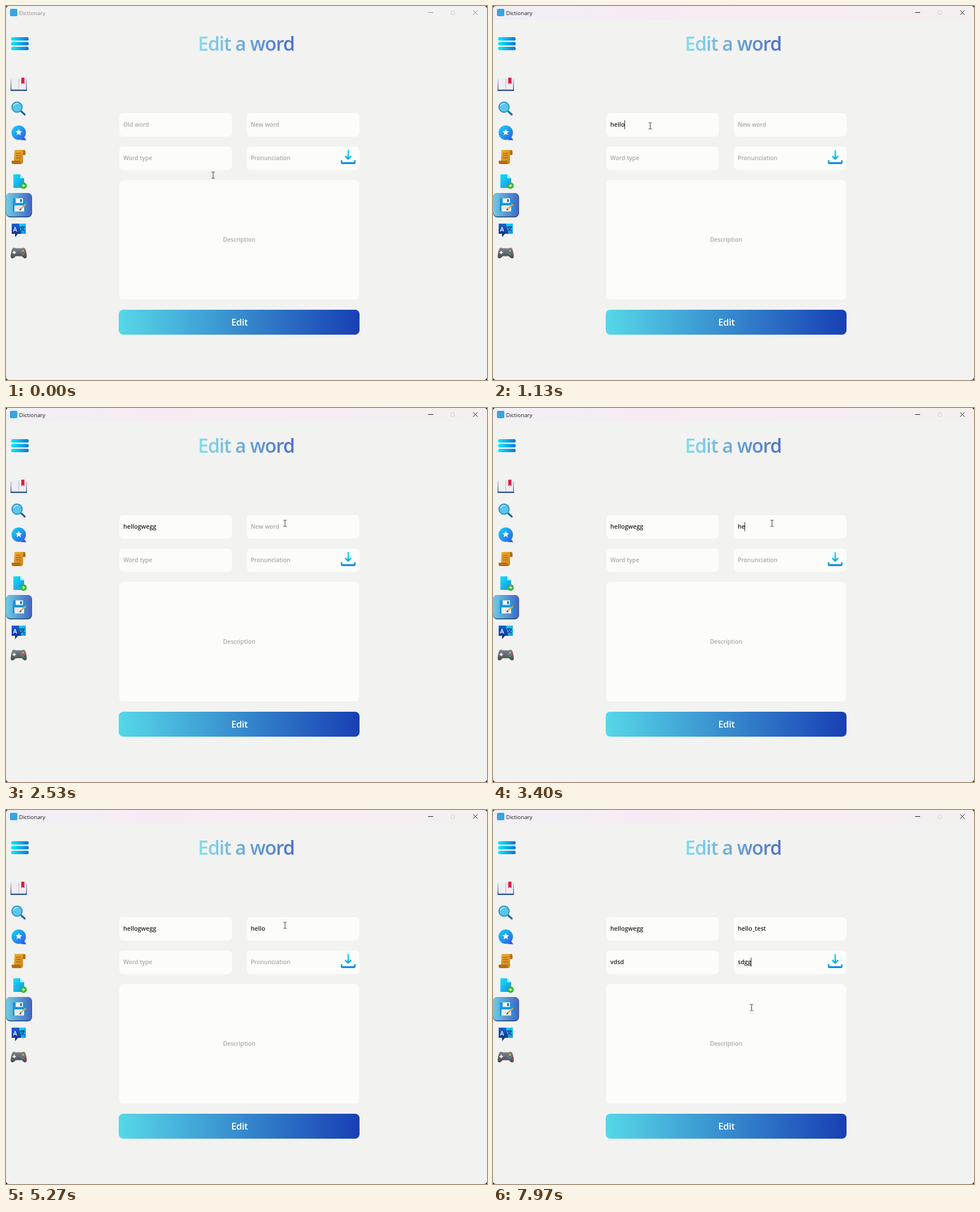
An HTML page that plays this animation: 849 by 660 pixels, repeating every 8000 ms.

```html
<!DOCTYPE html>
<html lang="en">
<head>
<meta charset="utf-8">
<title>Dictionary</title>
<style>
  html, body { margin: 0; width: 100%; height: 100%; overflow: hidden; background: #222; }
  svg { display: block; width: 849px; height: 660px; font-family: "Open Sans", "Noto Sans", sans-serif; }
  .field { fill: #fcfdfb; stroke: #edf3ef; }
  .hint, .typed { font-weight: 600; white-space: pre; }
  .hint { font-size: 10.3px; fill: #aba7a4; }
  .typed { font-size: 10.7px; fill: #242220; }
</style>
</head>
<body>
<svg viewBox="0 0 849 660">
  <defs>
    <linearGradient id="button"><stop stop-color="#56d8e8"/><stop offset="1" stop-color="#183fb4"/></linearGradient>
    <linearGradient id="heading"><stop stop-color="#86deea"/><stop offset="1" stop-color="#4b6fc8"/></linearGradient>
    <linearGradient id="tile"><stop stop-color="#70cde2"/><stop offset="1" stop-color="#4365c4"/></linearGradient>
    <linearGradient id="menu"><stop stop-color="#0cecfd"/><stop offset="1" stop-color="#1173d8"/></linearGradient>
    <linearGradient id="cyan" x2="1" y2="1"><stop stop-color="#10e4fa"/><stop offset="1" stop-color="#1d8be0"/></linearGradient>
    <linearGradient id="drop" gradientUnits="userSpaceOnUse" x1="0" x2="0" y1="254" y2="280"><stop stop-color="#10e4f6"/><stop offset="1" stop-color="#1584d8"/></linearGradient>
    <linearGradient id="bubble" x2="1" y2="1"><stop stop-color="#10d8fc"/><stop offset="1" stop-color="#3257e4"/></linearGradient>
    <linearGradient id="gold" x2="1" y2="1"><stop stop-color="#f0b43c"/><stop offset="1" stop-color="#c47c16"/></linearGradient>
    <linearGradient id="navy" x2="0" y2="1"><stop stop-color="#1b62d2"/><stop offset="1" stop-color="#082a80"/></linearGradient>
    <linearGradient id="pad" x2="0" y2="1"><stop stop-color="#84858a"/><stop offset="1" stop-color="#46474c"/></linearGradient>
    <linearGradient id="cover" x2="0" y2="1"><stop stop-color="#c9cdd8"/><stop offset="1" stop-color="#294f8b"/></linearGradient>
    <linearGradient id="bar"><stop stop-color="#f1eff5"/><stop offset=".3" stop-color="#f6ebf4"/><stop offset="1" stop-color="#f5eff0"/></linearGradient>
    <clipPath id="window"><rect width="849" height="660" rx="5"/></clipPath>
  </defs>

  <g clip-path="url(#window)">
    <rect width="849" height="660" fill="#f2f2f1"/>
    <rect id="activeBar" width="849" height="24" fill="url(#bar)"/>
    <rect x="7" y="5" width="13" height="13" rx="2" fill="#35a5e6"/>
    <g id="chrome">
      <text x="23" y="15.5" font-size="9.8" fill="currentColor">Dictionary</text>
      <path d="M745 11.5h9M824.5 7.5l8 8m0-8l-8 8" stroke="currentColor" fill="none"/>
    </g>
    <rect x="785.5" y="8.5" width="6" height="6.5" rx="1" fill="none" stroke="#d0cdd0"/>

    <text x="424" y="79" text-anchor="middle" font-size="33.5" font-weight="600" letter-spacing="-1" fill="url(#heading)">Edit a word</text>

    <!-- menu -->
    <g fill="url(#menu)">
      <rect x="9" y="55" width="31" height="6" rx="2.5"/>
      <rect x="9" y="63.5" width="31" height="6" rx="2.5"/>
      <rect x="9" y="72" width="31" height="6" rx="2.5"/>
    </g>

    <!-- book -->
    <path d="M8 129h29v21H8z" fill="url(#cover)"/>
    <path d="M9.5 127q7-2 13 1.5q6-3.5 13-1.5v20.5H9.5z" fill="#f0edf2"/>
    <path d="M22.5 128v20" stroke="#b9bdc8"/>
    <path d="M27 126.5h5.5V138l-2.750-2-2.750 2z" fill="#e5173f"/>

    <!-- search -->
    <path d="M27 186l6 5.5" stroke="#1b6aa8" stroke-width="3.5" stroke-linecap="round"/>
    <circle cx="19.5" cy="178.5" r="9" fill="#5cc6ea" stroke="#2c94c6" stroke-width="2"/>
    <path d="M13 177q2-5 8-5" stroke="#a4e4f7" stroke-width="2" fill="none"/>

    <!-- favourites -->
    <path d="M31 230l5 7-10-.5z" fill="#3257e4"/>
    <circle cx="22.5" cy="223.5" r="12.7" fill="url(#bubble)"/>
    <path id="star" fill="#fff"/>

    <!-- history -->
    <path d="M15 254h17q3 1 2 9h-4v13q-1 3-4 3H12q-3-1-2-6h4z" fill="url(#gold)"/>
    <path d="M30 263v-6q0-3 2.5-3t1.8 9zM10 273h15q0 5 2 6H12q-2-1-2-6z" fill="#b56d0c"/>
    <path d="M17 260h9m-9 4h9m-9 4h9" stroke="#96590a" stroke-width="1.2"/>

    <!-- add -->
    <path d="M13 297h12l7 7v17H13z" fill="url(#cyan)"/>
    <path d="M25 297v7h7z" fill="#a5eefa"/>
    <circle cx="31" cy="317" r="5.7" fill="#2fb52f"/>
    <path d="M28 317h6m-3-3v6" stroke="#eaffea" stroke-width="1.3"/>

    <!-- edit (selected) -->
    <rect y="330" width="46" height="43" rx="8" fill="#204577"/>
    <rect y="330" width="45.500" height="41.500" rx="8" fill="url(#tile)"/>
    <path d="M12 339.5h20l3 3v20H12z" fill="#1597e0"/>
    <path d="M17 339.5h13v8H17zM15 352h17v10.5H15z" fill="#f5f8fc"/>
    <path d="M25 341h3v5h-3z" fill="#2767a9"/>
    <path d="M18 355h8m-8 3h6" stroke="#b6c6d7"/>
    <path d="M26 358l9-8" stroke="#f0a734" stroke-width="2.5"/>
    <path d="M23.5 361l1.5-4 2.5 2.5z" fill="#493525"/>

    <!-- translate -->
    <path d="M22 384h13v18H22z" fill="url(#cyan)"/>
    <path d="M10 384h13l4 18h-6l-5 6v-6h-6z" fill="url(#navy)"/>
    <text x="12.5" y="397.5" font-size="10.5" font-weight="600" fill="#fff">A</text>
    <path d="M25 390h8m-4-2v2m3 0q-2 5-6 7m0-7q2 5 7 7" stroke="#0b337e" stroke-width="1.3" fill="none"/>

    <!-- games -->
    <path d="M13 426.5q3 0 4 1h11q1-1 4-1q3 1 4.500 12q1 7-3 7q-3-.5-5.500-4H17q-2.500 3.500-5.500 4q-4 0-3-7q1.500-11 4.500-12z" fill="url(#pad)"/>
    <path d="M11.5 435h6m-3-3v6" stroke="#f2f2f2" stroke-width="2"/>
    <circle cx="30" cy="432" r="1.5" fill="#e9c33a"/><circle cx="30" cy="438" r="1.5" fill="#40aa52"/>
    <circle cx="27" cy="435" r="1.5" fill="#418fe1"/><circle cx="33" cy="435" r="1.5" fill="#e04646"/>

    <!-- form -->
    <g id="form"></g>
    <rect class="field" x="199.5" y="306.5" width="424.5" height="212" rx="8"/>
    <text class="hint" x="411.5" y="416" text-anchor="middle">Description</text>
    <path d="M604 255v15m-4.500-4.500l4.500 4.500 4.500-4.500" fill="none" stroke="url(#drop)" stroke-width="2.5" stroke-linecap="round" stroke-linejoin="round"/>
    <path d="M591 272h2.5v3.500h21V272h2.5v4q0 3-3 3h-20q-3 0-3-3z" fill="url(#drop)"/>
    <rect x="199" y="536" width="425" height="44" rx="8" fill="url(#button)"/>
    <text x="412" y="563.5" text-anchor="middle" font-size="16.5" font-weight="600" letter-spacing="-.4" fill="#fff">Edit</text>

    <path id="caret" d="M0 0v16" stroke="#2a2a2a"/>
    <path id="pointer" d="M-3-5.5h2q1 0 1 1q0-1 1-1h2M0-5V5M-3 5.5h2q1 0 1-1q0 1 1 1h2" fill="none" stroke="#3c3c3c"/>
  </g>
</svg>
<script>
const LOOP = 8000, BLINK = 530;
const $ = id => document.getElementById(id);

// focus: click time; runs: [first key time, gap between keys, text]
const fields = [
  { x: 199.5, y: 188.5, hint: 'Old word', focus: 640, runs: [[850, 68, 'hellogwegg']] },
  { x: 424.5, y: 188.5, hint: 'New word', focus: 1820,
    runs: [[3180, 120, 'he'], [3460, 90, 'llo'], [5500, 0, '_'], [5760, 100, 'test']] },
  { x: 199.5, y: 247.5, hint: 'Word type', focus: 6960, runs: [[7030, 65, 'vdsd']] },
  { x: 424.5, y: 247.5, hint: 'Pronunciation', focus: 7430, runs: [[7510, 75, 'sdgg']] }
];

// [time, x, y]
const path = [
  [0, 365, 298], [80, 365, 298], [580, 277, 211], [1500, 277, 211], [1800, 492, 203],
  [6430, 492, 203], [6800, 246, 291], [6940, 246, 270], [7240, 246, 270],
  [7410, 456, 270], [7640, 456, 270], [7900, 456, 348], [LOOP, 456, 348]
];

const starPoint = (_, i) => {
  const r = i % 2 ? 2.8 : 6.3, a = i * Math.PI / 5;
  return `${22.5 + r * Math.sin(a)} ${223 - r * Math.cos(a)}`;
};
$('star').setAttribute('d', `M${Array.from({ length: 10 }, starPoint).join('L')}z`);

for (const f of fields) {
  $('form').insertAdjacentHTML('beforeend',
    `<rect class="field" x="${f.x}" y="${f.y}" width="200" height="42.5" rx="8"/>
     <text x="${f.x + 7.5}" y="${f.y + 24.7}"></text>`);
  f.text = $('form').lastElementChild;
  f.keys = f.runs.flatMap(([start, gap, s]) => [...s].map((char, i) => ({ at: start + i * gap, char })));
}

function pointerAt(t) {
  const i = path.findIndex(p => p[0] > t);
  const [t0, x0, y0] = path[i - 1], [t1, x1, y1] = path[i];
  const u = (t - t0) / (t1 - t0), e = u * u * (3 - 2 * u);
  return [x0 + (x1 - x0) * e, y0 + (y1 - y0) * e];
}

function draw(t) {
  const active = t >= fields[0].focus;
  $('activeBar').style.opacity = active ? 1 : 0;
  $('chrome').style.color = active ? '#1d1a1d' : '#8b8988';

  let focused = null;
  for (const f of fields) {
    f.pressed = f.keys.filter(k => k.at <= t);
    const typed = f.pressed.length > 0;
    f.text.setAttribute('class', typed ? 'typed' : 'hint');
    f.text.textContent = typed ? f.pressed.map(k => k.char).join('') : f.hint;
    if (t >= f.focus) focused = f;
  }

  let caretOn = false;
  if (focused) {
    const { x, y, text, pressed } = focused;
    const last = pressed.length ? pressed.at(-1).at : focused.focus;
    caretOn = (t - last) % (2 * BLINK) < BLINK;
    const width = pressed.length ? text.getComputedTextLength() : 0;
    $('caret').setAttribute('transform', `translate(${Math.floor(x + 7.5 + width) + .5} ${y + 13})`);
  }
  $('caret').style.display = caretOn ? '' : 'none';

  const [px, py] = pointerAt(t).map(v => Math.round(v) + .5);
  $('pointer').setAttribute('transform', `translate(${px} ${py})`);
}

const start = performance.now();
function tick() {
  draw((performance.now() - start) % LOOP);
  requestAnimationFrame(tick);
}
tick();
</script>
</body>
</html>
```
